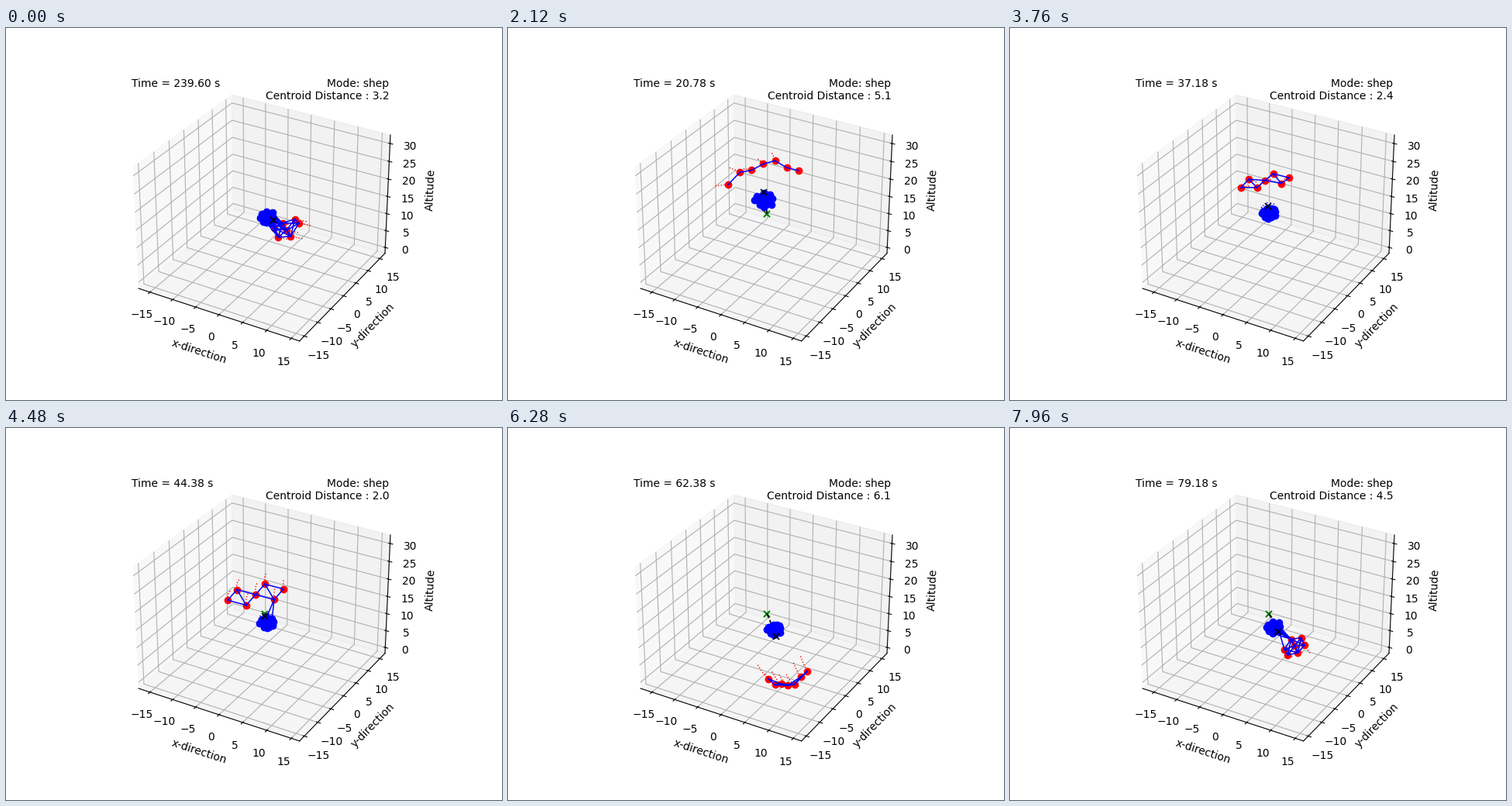
Recreate the animation shown at these times as a matplotlib script. Size 640 by 480 pixels, loop 8 s.

```python
import numpy as np
import matplotlib.pyplot as plt
from matplotlib.animation import FuncAnimation

FRAMES, TAIL, LATE = 200, 10, 600
DOGS, SHEEP, LINK = 7, 20, 25
GOAL = np.array([334.3, 239.6])

# Key moments in frames; the loop opens with the end of the run, then restarts.
KEYS = np.array([2, 31, 74, 112, 136, 160, 179, 199, LATE - TAIL, LATE], float)

# The shepherds form an arc: middle, half width, sag and weave, in pixels.
# The flock is a disc with a middle; the last row is the printed distance.
TRACKS = np.array([
    [328, 318, 340, 322, 338, 364, 377, 367, 377, 362],
    [216, 196, 197, 215, 273, 321, 303, 283, 258, 255],
    [12, 56, 27, 36, 30, 24, 15.5, 13, 16, 16],
    [-4, -26, -4, 0, 18, 11, -13, -2, 6, 6],
    [3, 10, -2, 13, -4, -2, -3, -11, -11, -11],
    [331, 330, 332, 337, 341, 344, 345, 340, 337, 337],
    [218, 221, 225, 251, 258, 260, 259, 257, 244, 244],
    [6.2, 5.8, 4.1, 2.0, 5.3, 6.1, 5.7, 4.5, 3.2, 3.2],
])
RATES = np.gradient(TRACKS, KEYS, axis=1)

K = np.arange(DOGS)
U = np.linspace(-1, 1, DOGS)
I = np.arange(SHEEP)
DISC = (np.sqrt((I + 0.5) / SHEEP) * [np.cos(2.4 * I), np.sin(2.4 * I)]).T * [10, 7.5]
STRAY = np.random.default_rng(4).uniform(0.8, 1.2, (SHEEP, 1))


def state(p):
    """Cubic Hermite through the key moments, straight on after the last."""
    if p >= KEYS[-1]:
        return TRACKS[:, -1] + RATES[:, -1] * (p - KEYS[-1])
    k = np.searchsorted(KEYS, p, side="right") - 1
    h = KEYS[k + 1] - KEYS[k]
    s = (p - KEYS[k]) / h
    return ((1 + 2 * s) * (1 - s) ** 2 * TRACKS[:, k]
            + s * (1 - s) ** 2 * h * RATES[:, k]
            + s * s * (3 - 2 * s) * TRACKS[:, k + 1]
            + s * s * (s - 1) * h * RATES[:, k + 1])


def dogs_at(p):
    x, y, width, sag, weave = state(p)[:5]
    arc = sag * (1 - U ** 2) - 0.2 * width * U
    return np.column_stack([x + width * U, y + arc - weave * np.sin(K * 2 * np.pi / 3)])


def sheep_at(p):
    spread = np.interp(p, [2, 31, 64], [2.8, 1.8, 1])
    wobble = 0.6 * np.column_stack([np.sin(p / 9 + I), np.cos(p / 11 + 2 * I)])
    return state(p)[5:7] + DISC * spread * STRAY ** (spread - 1) + wobble


def tails(where, p):
    times = np.arange(max(p - TAIL, KEYS[0]), p + 1)
    paths = np.stack([where(t) for t in times], axis=1)
    gap = np.full((len(paths), 1, 2), np.nan)
    return np.concatenate([paths, gap], axis=1).reshape(-1, 2)


def links(pts):
    dist = np.linalg.norm(pts[:, None] - pts, axis=2)
    i, j = np.nonzero(np.triu(dist < LINK, 1))
    out = np.full((3 * len(i), 2), np.nan)
    out[0::3], out[1::3] = pts[i], pts[j]
    return out


fig = plt.figure(figsize=(6.4, 4.8), dpi=100)
box = fig.add_subplot(projection="3d")
box.set(xlim=(-17.55, 16.67), ylim=(-16.75, 17.25), zlim=(-1.75, 32.35),
        xlabel="x-direction", ylabel="y-direction", zlabel="Altitude",
        xticks=range(-15, 16, 5), yticks=range(-15, 16, 5), zticks=range(0, 31, 5))
clock = box.text2D(0.05, 0.95, "", transform=box.transAxes)
box.text2D(0.95, 0.95, "Mode: shep", ha="right", transform=box.transAxes)
distance = box.text2D(0.95, 0.907, "", ha="right", transform=box.transAxes)

stage = fig.add_axes([0, 0, 1, 1])
stage.set(xlim=(0, 640), ylim=(480, 0))
stage.axis("off")


def layer(fmt, **style):
    return stage.plot([], [], fmt, **style)[0]


goal = layer("gx", mew=1.5)
goal.set_data(GOAL[:1], GOAL[1:])
offset = layer("k--", lw=1.2)
dog_tails = layer("r:", lw=1)
sheep_tails = layer("b:", lw=1)
dogs = layer("ro")
mesh = layer("b-", lw=1.1)
sheep = layer("bo")
centroid = layer("kx", mew=1.2)


def draw(n):
    restarted = n >= KEYS[0]
    p = n if restarted else LATE + n
    seconds = 0.4 * p - (0.42 if restarted else 0.4)
    d, s = dogs_at(p), sheep_at(p)
    now = state(p)

    # The centroid mark leans from the flock towards the shepherds.
    lean = now[:2] - now[5:7]
    mark = now[5:7] + 9 * lean / np.hypot(*lean)

    clock.set_text(f"Time = {seconds:.2f} s")
    distance.set_text(f"Centroid Distance : {now[7]:.1f}")
    dogs.set_data(*d.T)
    sheep.set_data(*s.T)
    dog_tails.set_data(*tails(dogs_at, p).T)
    sheep_tails.set_data(*tails(sheep_at, p).T)
    mesh.set_data(*links(np.concatenate([d, s])).T)
    offset.set_data(*np.transpose([GOAL, mark]))
    centroid.set_data(mark[:1], mark[1:])


anim = FuncAnimation(fig, draw, frames=FRAMES, init_func=lambda: draw(0),
                     interval=40, repeat=True, repeat_delay=0)
plt.show()
```
